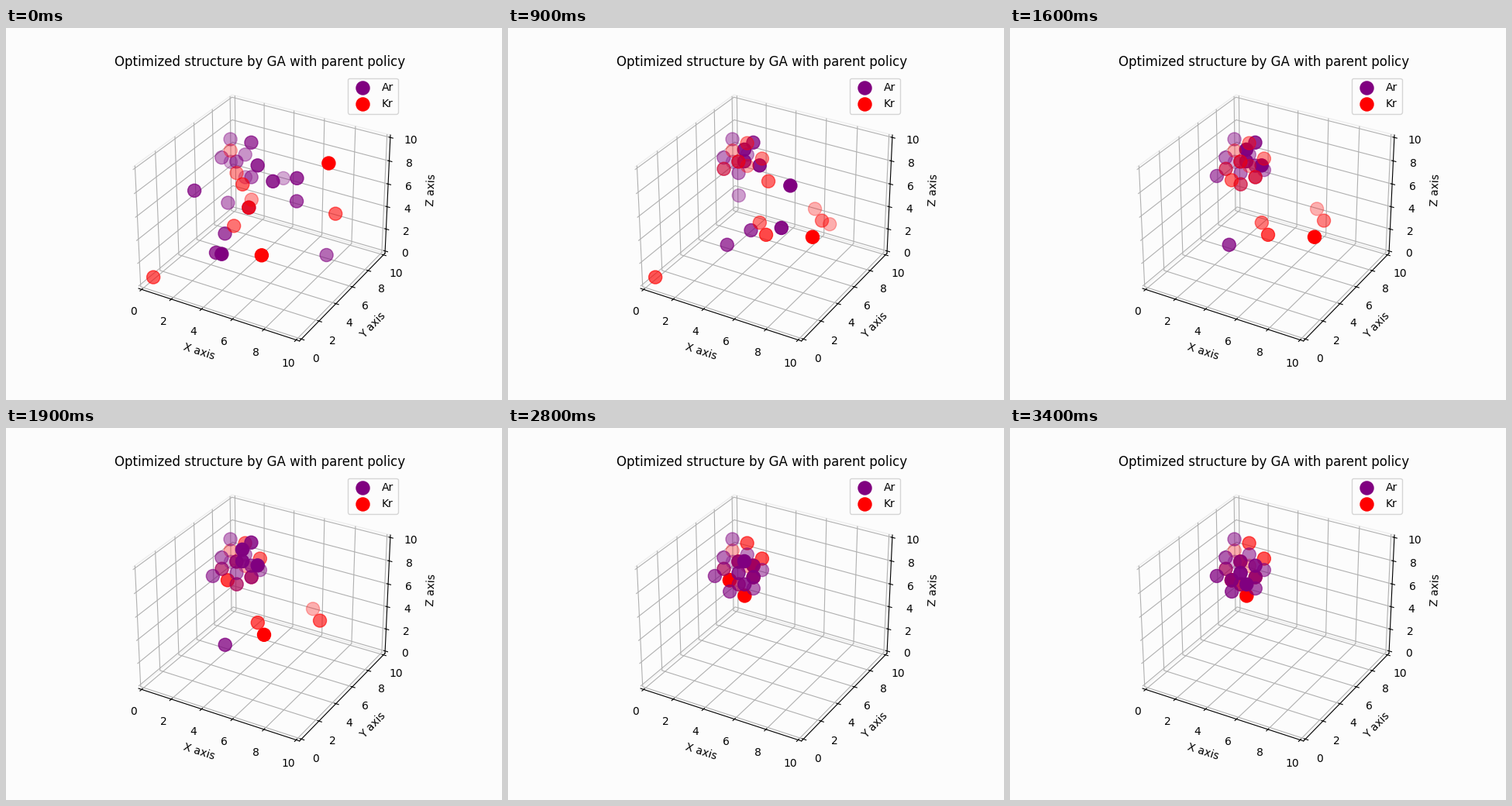
These frames come from a looping animation (640 by 480 pixels, 3.5 s). A matplotlib script:

```python
import math
import random
from itertools import product

import matplotlib.pyplot as plt
from matplotlib.animation import FuncAnimation

FRAMES, STEP_MS = 35, 100
ATOMS = 30
PAPER = "#fcfcfc"
COLORS = {"Ar": "purple", "Kr": "red"}
CORE = (2, 7, 6)      # middle of the final cluster
NUCLEUS = (1, 8, 7)   # site where the cluster starts to grow

# Isolated atoms that last for some generations, in order of arrival
LONERS = [
    ("Kr", (0, 1, 0)), ("Ar", (3, 7, 9)), ("Ar", (4, 6, 8)),
    ("Kr", (4, 6, 3)), ("Kr", (8, 5, 4)), ("Kr", (6, 9, 3)),
    ("Kr", (7, 8, 3)), ("Ar", (3, 6, 8)), ("Ar", (3, 4, 2)),
    ("Kr", (5, 5, 3)), ("Ar", (3, 6, 9)),
]


def grow_cluster():
    """A tilted slab with alternating elements, filled outward from the nucleus."""
    for u, v, w in product((-1, 0, 1), repeat=3):
        if not -1 <= u + v + w <= 2:
            continue
        site = (CORE[0] + u, CORE[1] + v, CORE[2] + v + w)
        start = 2.5 * (math.dist(site, NUCLEUS) ** 2 - 1)
        even = sum(site) % 2 == 0
        if even:
            yield "Kr", start, FRAMES, site
        if not even or v == 0:
            yield "Ar", start, FRAMES, site


def hold_loners():
    """The farther an atom is from the core, the sooner it is dropped."""
    for i, (kind, site) in enumerate(LONERS):
        yield kind, i - 2, 37 - 3 * math.dist(site, CORE), site


def stray(i, step):
    """A random site, redrawn every four steps and closing in on the core."""
    era = (step + i) // 4
    rng = random.Random(1000 * i + era)
    spread = max(0.15, 1 - era / 6)
    site = [round(c + spread * (rng.uniform(0, 10) - c)) for c in CORE]
    return "Ar" if i % 3 else "Kr", site


stays = [*grow_cluster(), *hold_loners()]


def atoms_at(step):
    atoms = [(kind, site) for kind, start, stop, site in stays
             if start <= step < stop]
    return atoms + [stray(i, step) for i in range(ATOMS - len(atoms))]


plt.rcParams["font.family"] = "DejaVu Sans"
fig = plt.figure(figsize=(6.4, 4.8), dpi=100, facecolor=PAPER)
ax = fig.add_subplot(projection="3d", facecolor=PAPER)
ax.set_title("Optimized structure by GA with parent policy")
ax.set(xlabel="X axis", ylabel="Y axis", zlabel="Z axis")
for set_lim in (ax.set_xlim, ax.set_ylim, ax.set_zlim):
    set_lim(0, 10, view_margin=1 / 48)
for axis in (ax.xaxis, ax.yaxis, ax.zaxis):
    axis.set_pane_color(PAPER)
    axis.pane.set_edgecolor("#eeeeee")

clouds = []


def draw(step):
    while clouds:
        clouds.pop().remove()
    atoms = atoms_at(step)
    for kind, color in COLORS.items():
        sites = [site for k, site in atoms if k == kind]
        clouds.append(ax.scatter(*zip(*sites), s=150, c=color, label=kind))
    return clouds


draw(0)
ax.legend(loc="upper right", facecolor=PAPER)

anim = FuncAnimation(fig, draw, frames=FRAMES, interval=STEP_MS,
                     init_func=lambda: draw(0), repeat=True, repeat_delay=0,
                     blit=False)
plt.show()
```
